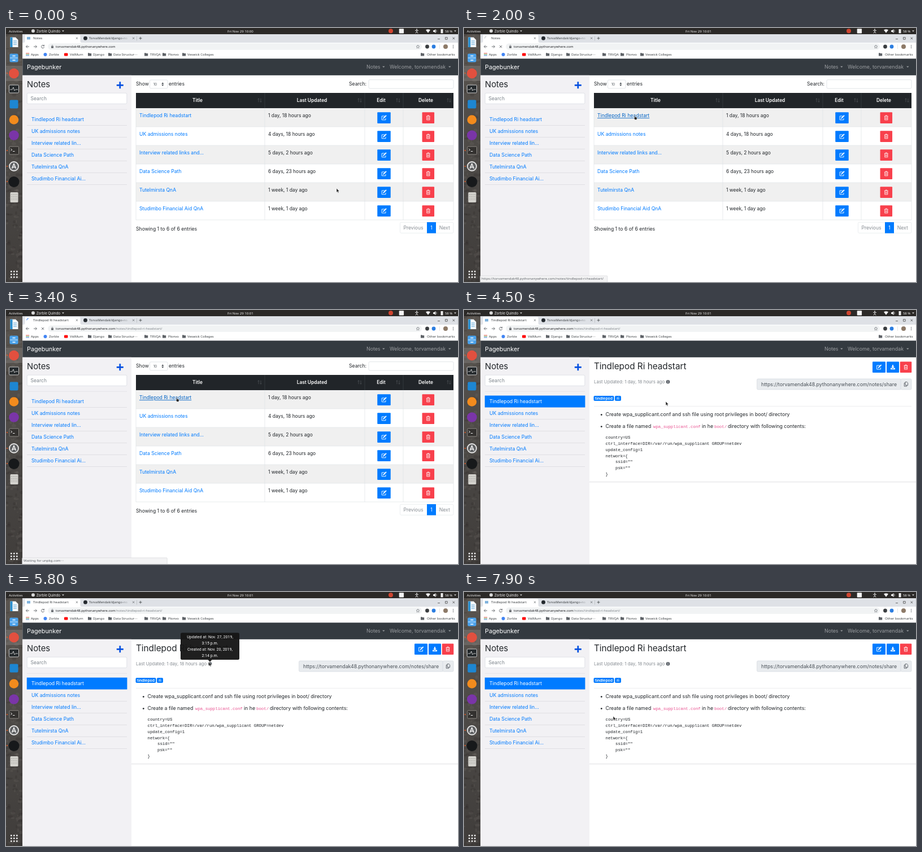
Write an HTML page that moves like this. It is 800 px wide and 450 px high and loops after 8000 ms.

```html
<!DOCTYPE html>
<html lang="en">
<head>
<meta charset="utf-8">
<title>Notes</title>
<style>
html, body { margin: 0; width: 100%; height: 100%; overflow: hidden; background: #fff; }
svg { display: block; width: 100vw; height: 100vh; }
text { white-space: pre; }
.page { font-family: Inter, sans-serif; }
.ui { font-family: "Noto Sans", sans-serif; }
.tip { font-family: Roboto, sans-serif; }
.mono { font-family: "Liberation Mono", monospace; }
</style>
</head>
<body>
<svg id="stage" viewBox="0 0 800 450"></svg>
<script>
const BLUE = '#007bff', RED = '#f8404c', INK = '#212529', GREY = '#868c92', LINE = '#dee2e6', UI = '#3c4043';
const HOST = 'torvamendak48.pythonanywhere.com';
const PATH = '/notes/tindlepod-ri-headstart/';

const text = (x, y, s, size = 8.65, fill = INK, cls = 'page', more = '') =>
  `<text x="${x}" y="${y}" font-size="${size}" fill="${fill}" class="${cls}" ${more}>${s}</text>`;
const ui = (x, y, s, fill = UI, size = 5.9, more = '') => text(x, y, s, size, fill, 'ui', more);
const rect = (x, y, w, h, fill, more = '') => `<rect x="${x}" y="${y}" width="${w}" height="${h}" fill="${fill}" ${more}/>`;
const box = (x, y, w, h, fill = '#fff', stroke = '#ced4da', r = 2, more = '') =>
  rect(x, y, w, h, fill, `stroke="${stroke}" stroke-width=".6" rx="${r}" ${more}`);
const dot = (x, y, r, fill, more = '') => `<circle cx="${x}" cy="${y}" r="${r}" fill="${fill}" ${more}/>`;
const line = (d, stroke, w = .8, more = '') => `<path d="${d}" fill="none" stroke="${stroke}" stroke-width="${w}" ${more}/>`;
const shape = (d, color) => `<path d="${d}" fill="${color}"/>`;
const group = (id, ...parts) => `<g id="${id}">${parts.flat().join('')}</g>`;
const at = (x, y, s) => `<g transform="translate(${x} ${y})">${s}</g>`;
const caret = (x, y, color, w = 4) => shape(`M${x} ${y}h${w}l${-w / 2} ${w / 2}z`, color);
const MID = 'text-anchor="middle"';

// Button glyphs, centred on the origin
const pencil = line('M1.5 -3H-3.8V3.8H3V.8', '#fff', .9) + line('M-1.2 1.2L4.1 -4.1', '#fff', 1.7) + line('M-1.6 1.7l.8 -.3', '#fff', .8);
const trash = line('M-3.4 -2.7H3.4M-1.2 -3V-4H1.2V-3M-2.6 -2.5V3.9H2.6V-2.5M-1 -1V2.6M1 -1V2.6', '#fff', .8);
const download = shape('M-1 -4H1V-.8H3L0 2.2L-3 -.8H-1zM-4 1.6H-1.8L0 3.2L1.8 1.6H4V4H-4z', '#fff');
const copy = line('M-1.3 -3.8H1.6L3.3 -2.2V2H-1.3zM-1.3 -2H-3.1V3.9H1.4V2', '#495057', .8);
const button = (x, y, w, color, glyph) => rect(x - w / 2, y - 9.7, w, 19.6, color, 'rx="1"') + at(x, y, glyph);

function dock() {
  let seed = 7;
  const rnd = () => (seed = seed * 16807 % 2147483647) / 2147483647;
  const rocks = Array.from({ length: 160 }, () =>
    `<ellipse cx="${rnd() * 29}" cy="${11 + rnd() * 439}" rx="${1 + rnd() * 4}" ry="${.8 + rnd() * 2.5}" fill="${rnd() < .55 ? '#1f1d1c' : '#7d7770'}" opacity=".17"/>`);
  const square = (y, color) => rect(6.5, y - 7.5, 15, 15, color, 'rx="2"');
  const grid = [0, 1, 2].flatMap(i => [0, 1, 2].map(j => dot(9.3 + i * 5, 431.5 + j * 5, 1.4, '#eee')));
  return `<g clip-path="url(#dockClip)">` + rect(0, 10, 30, 440, 'url(#rock)') + rocks.join('') + '</g>' +
    shape('M7.5 16.5H17L21.5 21V34H7.5z', '#f4f8fb') + rect(7.5, 16.5, 4, 17.5, '#2a8fcf') + line('M13 23h6M13 26h6M13 29h6', '#5aa5d6', 1) +
    square(53, '#4aa2ec') + line('M7 53H21', '#d8ecfb', 1) + line('M11.5 49.5H16.5M11.5 57H16.5', '#fff', 1.4) +
    rect(0, 67, 29.3, 27, '#fff', 'opacity=".12"') + dot(14, 80.5, 9, '#e2503f') +
    rect(5.5, 101, 17, 14, '#24292c', 'stroke="#c9c9c9" stroke-width="1" rx="1.5"') + line('M7 109h4l2 -4l2 6l2 -2h4', '#e8e8e8', .8) +
    square(135, '#1d86d2') + dot(14, 162.5, 8.3, '#f38b1d') + dot(14, 190, 8.8, '#7a35a8') +
    rect(6, 210, 16.5, 14, '#33312f', 'stroke="#8c8883" stroke-width="1" rx="1.5"') + line('M8.5 214l2.3 1.8l-2.3 1.8M12 218.5h3.5', '#fff', .9) +
    dot(14, 245, 8, '#5f6163', 'stroke="#e6e6e6" stroke-width="1.8"') + line('M10.5 249L14 240.5L17.5 249M12 246.5h4', '#fff', 1.4) +
    dot(14, 272.5, 9.5, '#17191b') +
    rect(7.5, 291, 14, 18, '#d3d2cd', 'rx="1.5"') + line('M9 295h11M9 299h11M9 303h11', '#a3a29d', 1, 'stroke-dasharray="2 1"') +
    [80, 217, 245, 272].map(y => dot(2, y, 1.1, '#e8602c')).join('') + grid.join('');
}

function topBar() {
  return rect(0, 0, 800, 11, '#2b2927') + ui(5, 7.8, 'Activities', '#eee') +
    dot(48, 5.3, 3, '#d8d8d8') + ui(54, 7.8, 'Zorble Quindo', '#eee', 6.2) + caret(99, 4.5, '#eee') +
    ui(392, 7.8, '', '#eee', 6.1, 'id="clock"') +
    dot(681, 5.3, 4, '#d0442f') + rect(695.7, 1.2, 8.4, 8.4, '#f5f5f5', 'rx="1"') +
    dot(727, 2.6, 1, '#eee') + line('M724 4.4h6M727 4.4v2l-2 3M727 6.4l2 3', '#eee', .9) +
    shape('M743 3.5Q747 .8 751 3.5L747 8.8z', '#eee') +
    shape('M756 4h2l2.4 -2v7l-2.4 -2h-2z', '#eee') + line('M761.5 3.4q1.6 2 0 4', '#eee', .7) +
    rect(769.5, 2, 4, 7.3, '#eee') + ui(777, 7.8, '58 %', '#eee') + caret(793, 4.5, '#eee');
}

function browser() {
  const folder = x => shape(`M${x - 3} 44.2h2.4l.8 .9h3v4.4h-6.2z`, '#5f6368');
  const bookmark = (x, s) => ui(x, 49.2, s);
  const apps = [0, 1, 2].flatMap(i => [0, 1, 2].map(j => rect(35.5 + i * 2, 44 + j * 2, 1.4, 1.4, ['#e8584a', '#5b9e56', '#4a83e0'][j])));
  return rect(29.3, 11, 771, 15, '#dee1e6') +
    shape('M31 26Q33.5 26 33.5 23V15Q33.5 12 36 12H129Q131.5 12 131.5 15V23Q131.5 26 134 26z', '#fff') +
    rect(37, 15.8, 6, 4.6, '#7fb2dc', 'id="favicon"') + line('M36.8 18.2A3.2 3.2 0 0 1 40 15', BLUE, 1, 'id="spinner"') +
    ui(48, 20.2, '', UI, 5.9, 'id="tabTitle"') + line('M123.8 16.5l3.2 3.2m0 -3.2l-3.2 3.2', UI, .6) +
    dot(140.5, 18.2, 3.4, '#24292e') + ui(147, 20.2, 'TorvaMendak/django-no') + rect(200, 13, 19, 11, 'url(#fade)') +
    line('M224 16.5l3.2 3.2m0 -3.2l-3.2 3.2', UI, .6) + line('M231.5 14.5v8', '#a5a8ad', .5) + line('M235.5 18.2h5M238 15.7v5', UI, .8) +
    line('M764 19.5h4M777.5 16.5h3.6v3.6h-3.6zM790.5 16.5l3.6 3.6m0 -3.6l-3.6 3.6', '#333', .7) +
    rect(29.3, 26, 771, 28, '#fff') + rect(74, 27.3, 662, 11.4, '#f1f3f4', 'rx="5.7"') +
    line('M41 33H35.6M38 30.5L35.5 33L38 35.5', '#5f6368', .9) + line('M49 33h5.4M52 30.5L54.5 33L52 35.5', '#5f6368', .9) +
    line('M67 31.3A2.6 2.6 0 1 0 67.6 33.6M67.5 29.8v2h-2', '#5f6368', .9, 'id="reload"') +
    line('M63 30.9l4.2 4.2m0 -4.2l-4.2 4.2', '#5f6368', .9, 'id="stop"') +
    rect(80, 32.3, 4, 3.2, '#5f6368') + line('M81 32.3v-1a1 1 0 0 1 2 0v1', '#5f6368', .6) +
    ui(88, 35.2, `${HOST}<tspan id="urlPath" fill="#80868b">${PATH}</tspan>`, '#202124') +
    line('M729 30l.9 2 2.1 .2 -1.6 1.5 .5 2.1 -1.9 -1.1 -1.9 1.1 .5 -2.1 -1.6 -1.5 2.1 -.2z', '#5f6368', .6) +
    dot(745.5, 33, 3.4, '#3a3d40') + dot(757, 33, 3.4, '#2b7de0') + line('M767.5 29v8', '#ccc', .5) +
    dot(778, 33, 4, '#8d7a68') + [30.8, 33, 35.2].map(y => dot(791.5, y, .7, '#5f6368')).join('') +
    apps.join('') + bookmark(44, 'Apps') + dot(69.5, 47, 3, '#4285f4') + bookmark(76, 'Zorble') +
    rect(103, 44.6, 6.4, 4.8, '#f00', 'rx="1"') + bookmark(113, 'VidMurn') +
    [148, 184, 248, 280, 315, 737].map(folder).join('') +
    bookmark(154, 'Django') + bookmark(190, 'Data Structur⋯') + bookmark(255, 'TRVQA') + bookmark(287, 'Plonvo') +
    bookmark(321, 'Veswick Colleges') + ui(794.6, 49.2, 'Other bookmarks', UI, 6, 'text-anchor="end"');
}

function siteFrame() {
  const items = ['Tindlepod Ri headstart', 'UK admissions notes', 'Interview related lin…', 'Data Science Path', 'Tutelmirsta QnA', 'Studimbo Financial Ai…'];
  return rect(29.3, 54.3, 771, 29.5, '#343a40') + text(37, 73.2, 'Pagebunker', 10.8, '#fff') +
    text(638, 72.2, 'Notes', 8.8, '#9a9da0') + caret(666, 67.8, '#9a9da0', 4.6) +
    text(679, 72.2, 'Welcome, torvamendak', 8.9, '#9a9da0') + caret(783, 67.8, '#9a9da0', 4.6) +
    rect(29.3, 83.8, 192.7, 366.2, '#f2f1f4') + text(37, 105.2, 'Notes', 14.8) +
    line('M195.8 101.3h12M201.8 95.3v12', '#0650e0', 2.7) +
    box(37.3, 115.3, 176.5, 19) + text(43.5, 128, 'Search', 8.6, '#7b838a') + line('M37 144.3H214', '#dfdfe2', .7) +
    items.map((s, i) => line(`M37 ${172.5 + 21 * i}H214`, '#d9d9dd', .7) + text(45, 165.2 + 21 * i, s, 8.7, BLUE)).join('') +
    group('activeItem', rect(36.8, 151.6, 177.6, 20.9, BLUE), text(45, 165.2, items[0], 8.7, '#fff'));
}

function listPage() {
  const rows = [
    ['Tindlepod Ri headstart', '1 day, 18 hours ago'], ['UK admissions notes', '4 days, 18 hours ago'],
    ['Interview related links and…', '5 days, 2 hours ago'], ['Data Science Path', '6 days, 23 hours ago'],
    ['Tutelmirsta QnA', '1 week, 1 day ago'], ['Studimbo Financial Aid QnA', '1 week, 1 day ago']];
  const head = [['Title', 339, 449], ['Last Updated', 541.5, 626], ['Edit', 664, 694], ['Delete', 743, 784]];
  const sortIcon = x => line(`M${x - 2} 131.3v-6.5m-1.3 1.6l1.3 -1.6l1.3 1.6M${x + 2} 124.8v6.5m-1.3 -1.6l1.3 1.6l1.3 -1.6`, '#5b6065', .6);
  const row = ([title, updated], i) => {
    const y = 142 + 33 * i;
    return rect(230, y, 562, 33, i % 2 ? '#fff' : '#f0f0f0') + line(`M230 ${y}H792`, LINE, .7) +
      text(236, y + 16.3, title, 8.65, BLUE, 'page', i ? '' : 'id="link"') + text(464, y + 16.3, updated, 8.45) +
      button(669, y + 17, 23.5, BLUE, pencil) + button(747.3, y + 17, 21.5, RED, trash);
  };
  return text(230, 102.3, 'Show') + box(254.5, 92, 31.5, 15) + text(261, 102, '10', 5.8, '#495057') +
    shape('M275.3 99l2 -2.4l2 2.4zM275.3 100.3l2 2.4l2 -2.4z', '#343a40') + text(288, 102.3, 'entries') +
    text(607, 102.3, 'Search:') + box(642, 91.7, 150, 15.5) +
    rows.map(row).join('') + rect(230, 115, 562, 27, INK) +
    head.map(([s, x, icon]) => text(x, 131.2, s, 8.4, '#fff', 'page', MID + ' font-weight="600"') + sortIcon(icon)).join('') +
    line('M458 115V142M635 115V142M703 115V142', '#3a4046', .7) +
    line('M230 142V340H792V142M458 142V340M635 142V340M703 142V340', LINE, .7) +
    text(230, 359.3, 'Showing 1 to 6 of 6 entries') +
    box(697.5, 344.3, 94.3, 19, '#fff', LINE) + rect(745, 344, 16, 19.6, BLUE) +
    text(721, 357, 'Previous', 8.6, GREY, 'page', MID) + text(753, 357, '1', 8.6, '#fff', 'page', MID) + text(776.3, 357, 'Next', 8.6, GREY, 'page', MID);
}

function notePage() {
  const code = ['country=US', 'ctrl_interface=DIR=/var/run/wpa_supplicant GROUP=netdev', 'update_config=1', 'network={', '    ssid=""', '    psk=""', '}'];
  const badge = (x, w, s) => rect(x, 152, w, 9, BLUE, 'rx="2"') + text(x + w / 2, 158.8, s, 6.8, '#fff', 'page', MID + ' font-weight="600"');
  const pink = (x, s) => text(x, 209, s, 7.35, '#e8508f', 'mono');
  return text(230, 105.4, 'Tindlepod Ri headstart', 15.3) +
    button(734.5, 101.2, 23, BLUE, pencil) + button(759, 101.2, 22, BLUE, download) + button(782, 101.2, 20.5, RED, trash) +
    text(230, 130, 'Last Updated: 1 day, 18 hours ago', 7.9, GREY) + dot(361, 127.2, 3.3, '#5a6067') + line('M361 126.6v2.6M361 124.9v1', '#fff', .9) +
    box(518.5, 122, 255, 19, '#e9ecef') + `<g clip-path="url(#urlClip)">${text(526, 134.5, `https://${HOST}/notes/share`, 8.8, '#495057')}</g>` +
    box(773, 122, 19, 19, '#e9ecef') + at(782.3, 131.3, copy) +
    badge(229.5, 36, 'tindlepod') + badge(267, 11, 'ri') + line('M230 170.5H792', '#e6e6e8', .7) +
    dot(243.3, 185.6, 1.4, INK) + dot(243.3, 206.6, 1.4, INK) +
    text(250.5, 188.4, 'Create wpa_supplicant.conf and ssh file using root privileges in boot/ directory', 8.77) +
    text(250.5, 209.4, 'Create a file named', 8.77) + pink(335, 'wpa_supplicant.conf') + text(421, 209.4, 'in he', 8.77) +
    pink(443, 'boot/') + text(467, 209.4, 'directory with following contents:', 8.77) +
    code.map((s, i) => text(250.5, 228 + 10.85 * i, s, 7.3, INK, 'mono')).join('') + line('M222 304.7H800', '#dadade', .9);
}

function tooltip() {
  const lines = ['Updated at: Nov. 27, 2019,', '3:15 p.m.', 'Created at: Nov. 20, 2019,', '2:14 p.m.'];
  return rect(309, 72.2, 104, 47.8, '#161616', 'rx="2.5"') + shape('M357.5 119.9h7l-3.5 3.8z', '#161616') +
    lines.map((s, i) => text(361, 82.3 + 10.85 * i, s, 7.05, '#fff', 'tip', MID)).join('');
}

const stage = document.getElementById('stage');
stage.innerHTML = `<defs>
  <linearGradient id="rock" x2="0" y2="1"><stop stop-color="#59544f"/><stop offset=".5" stop-color="#4c4946"/><stop offset="1" stop-color="#403d3b"/></linearGradient>
  <linearGradient id="fade"><stop stop-color="#dee1e6" stop-opacity="0"/><stop offset="1" stop-color="#dee1e6"/></linearGradient>
  <clipPath id="dockClip"><rect y="10" width="29.3" height="440"/></clipPath>
  <clipPath id="urlClip"><rect x="526" y="122" width="240" height="19"/></clipPath></defs>` +
  rect(0, 0, 800, 450, '#fff') + dock() + browser() + topBar() + siteFrame() +
  group('list', listPage()) + group('note', notePage()) + group('tip', tooltip()) +
  group('status', box(28.7, 439, 225, 12, '#f3f3f4', '#d0d2d5', 1, 'id="statusBox"'), ui(31, 446.4, '', '#5f6368', 6.1, 'id="statusText"')) +
  group('cursor',
    group('arrow', '<path d="M0 0V7.2L1.7 5.7L2.8 8.2L4 7.7L2.9 5.3H5z" fill="#222" stroke="#fff" stroke-width=".5"/>'),
    group('hand', '<path d="M.8 .6Q1.6 -.3 2 .8V3.5L4.6 4.3Q5.4 4.6 5.2 5.6L4.6 8.6H1.6L-.4 5.6Q0 4.6 .8 5.2z" fill="#222" stroke="#fff" stroke-width=".5"/>'));

const $ = id => document.getElementById(id);
const show = (id, on) => $(id).style.display = on ? '' : 'none';
const clamp = v => Math.min(1, Math.max(0, v));

// Pointer stops: time, x, y
const route = [[0, 585, 284], [100, 585, 284], [1100, 301, 154], [4200, 301, 154], [4500, 357, 162], [5100, 359, 124],
  [6400, 359, 124], [6900, 415, 165], [7900, 264, 220], [8000, 264, 220]];

function pointer(t) {
  const i = route.findIndex(stop => stop[0] > t);
  const [t0, x0, y0] = route[i - 1], [t1, x1, y1] = route[i];
  const k = (t - t0) / (t1 - t0);
  return [x0 + (x1 - x0) * k, y0 + (y1 - y0) * k];
}

function draw(t) {
  const hover = t >= 1000 && t < 3800, loading = t >= 2000 && t < 4000;
  const committed = t >= 2900, opened = t >= 3800;
  $('clock').textContent = 'Fri Nov 29 10:0' + (t < 1300 ? 0 : 1);
  $('tabTitle').textContent = committed ? 'Tindlepod Ri headstart' : 'Notes';
  show('urlPath', committed);
  show('favicon', !loading);
  show('spinner', loading);
  $('spinner').setAttribute('stroke', committed ? '#4285f4' : '#c3c6ca');
  $('spinner').setAttribute('transform', `rotate(${(committed ? .36 : -.25) * (t - 3400)} 40 18.2)`);
  show('reload', !loading);
  show('stop', loading);
  show('list', !opened);
  show('note', opened);
  show('activeItem', opened);
  $('link').setAttribute('text-decoration', hover ? 'underline' : 'none');
  $('link').setAttribute('fill', hover ? '#0062c4' : BLUE);
  show('status', t >= 1300 && t < 4000);
  $('statusBox').setAttribute('width', committed ? 256.5 : 225);
  $('statusText').textContent = committed ? 'Waiting for unpkg.com⋯' : `https://${HOST}${PATH}`;
  $('tip').setAttribute('opacity', clamp((t - 5150) / 200) * clamp((6700 - t) / 150) * .96);
  $('cursor').setAttribute('transform', `translate(${pointer(t)})`);
  show('hand', hover);
  show('arrow', !hover);
}

const start = performance.now();
function tick() {
  draw((performance.now() - start) % 8000);
  requestAnimationFrame(tick);
}
tick();
</script>
</body>
</html>
```
